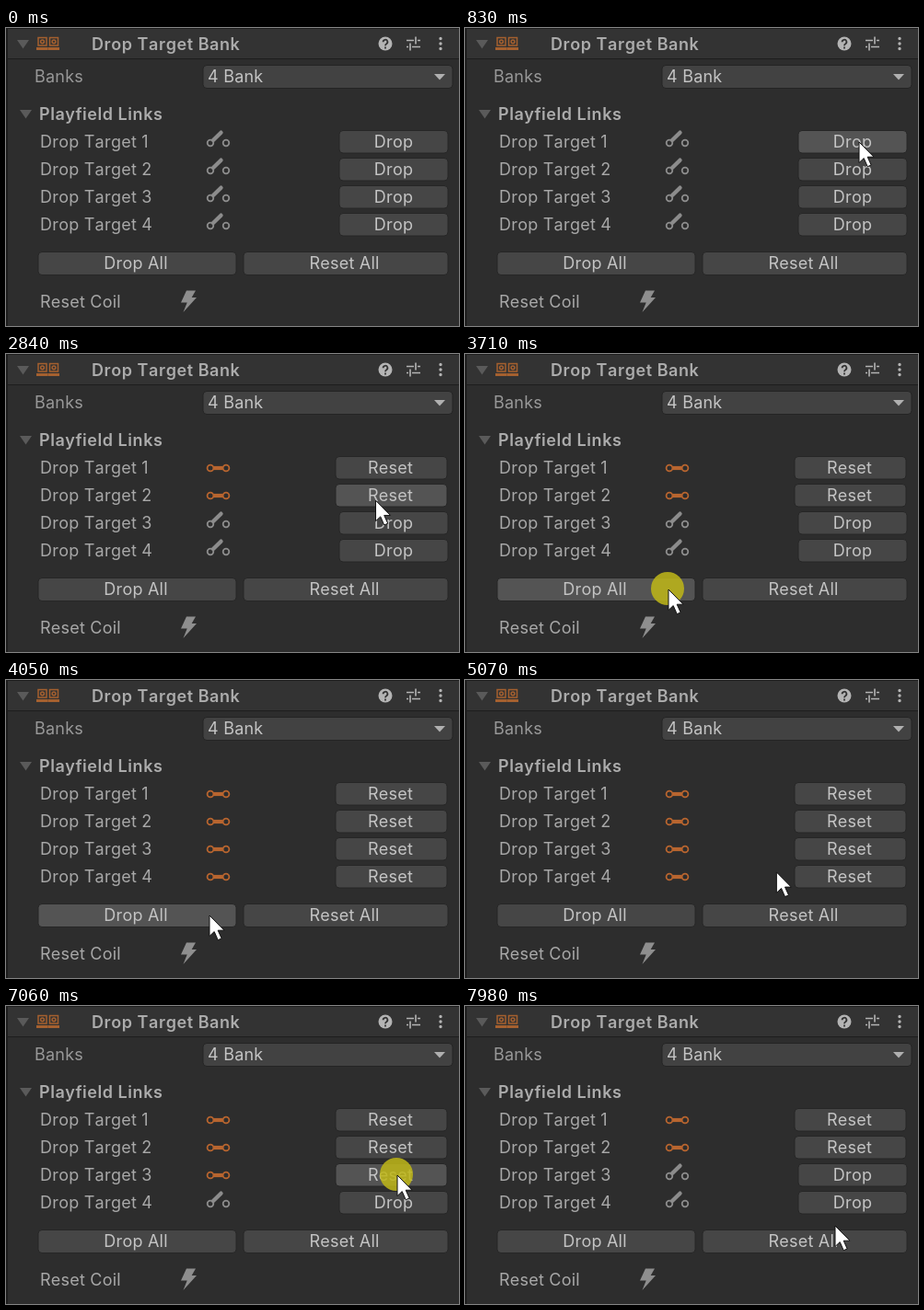
Recreate the animation shown at these times as an HTML page. Size 492x324 px, loop 8000 ms.

```html
<!DOCTYPE html>
<html lang="en">
<head>
<meta charset="utf-8">
<title>Drop Target Bank</title>
<style>
  html, body { margin: 0; width: 100%; height: 100%; overflow: hidden; background: #2d2d2d; }
  svg { display: block; width: 492px; height: 324px; }
  text { font: 18px Inter, sans-serif; font-kerning: none; letter-spacing: .22px; fill: #a8a8a8; }
  .bold { font-weight: 600; letter-spacing: .55px; fill: #acacac; }
  .lit { fill: #c4c4c4; }
  .mid { text-anchor: middle; }
  .dim { fill: #989898; }
  .fold { fill: #5a5a5a; }
  .box { fill: #464646; stroke: #262626; }
  .hover .box { fill: #545454; }
  .press .box { fill: #3d5067; }
  .open { stroke: #8c8c8c; fill: none; }
  .closed { stroke: #b8652f; fill: none; }
</style>
</head>
<body>
<svg viewBox="0 0 492 324">
  <defs>
    <g id="open" class="open" stroke-width="1.8">
      <circle cx="222" cy="125" r="3.3"/>
      <circle cx="239" cy="125" r="3.3"/>
      <path d="M225 122L233.5 113.7" stroke-width="4.4" stroke-linecap="round"/>
    </g>
    <g id="closed" class="closed" stroke-width="1.8">
      <circle cx="222" cy="124" r="3.4"/>
      <circle cx="239" cy="124" r="3.4"/>
      <path d="M225.5 124H235.5" stroke-width="4.2"/>
    </g>
    <g id="target" fill="none" stroke="#a5602f" stroke-width="1.5">
      <rect x="35" y="10.5" width="9" height="8.5"/>
      <circle cx="39.5" cy="14.8" r="1.9"/>
      <path d="M33 22.5H45.5" stroke-width="3"/>
    </g>
  </defs>

  <rect width="492" height="324" fill="#2d2d2d"/>
  <rect width="492" height="33" fill="#333"/>
  <path d="M0 .5H492M0 33.5H492" stroke="#1d1d1d"/>
  <rect width="2" height="324" fill="#1d1d1d"/>

  <path class="fold" d="M12 13H25L18.5 22.5Z"/>
  <use href="#target"/>
  <use href="#target" x="12.5"/>
  <text class="bold" x="93" y="24">Drop Target Bank</text>

  <circle cx="412" cy="17" r="7.5" fill="#b4b4b4"/>
  <path d="M409.6 15.2a2.4 2.4 0 1 1 3.6 2q-1.2.7-1.2 2M412 20.6v1.8" fill="none" stroke="#333" stroke-width="1.8"/>
  <path d="M435 13.5H443M447 13.5H450M435 20.5H437M441 20.5H450M445 9.5V17.5M439 16.5V24.5" stroke="#b4b4b4" stroke-width="1.6"/>
  <path d="M472 11.5h0M472 17h0M472 22.5h0" stroke="#b4b4b4" stroke-width="3.4" stroke-linecap="round"/>

  <text class="dim" x="31" y="59">Banks</text>
  <rect x="214" y="40.5" width="271" height="25" rx="4" fill="#424242" stroke="#242424"/>
  <text class="lit" x="219" y="59">4 Bank</text>
  <path d="M465 50H477L471 56.5Z" fill="#b0b0b0"/>

  <path class="fold" d="M15 89H28L21.5 98.5Z"/>
  <text class="bold" x="36" y="100">Playfield Links</text>
  <g id="rows"></g>
  <text x="37" y="304">Reset Coil</text>
  <path d="M196 285.5H206L201.7 293H207L192.5 309L196.7 298.5H190Z" fill="#8e8e8e"/>

  <g id="pointer">
    <circle id="ring" cx="-1" cy="-1" r="18" fill="#c0b818" fill-opacity=".85"/>
    <path d="M0 0V22.5L5.2 17.6L9.2 26.7L13.2 25L9.2 16.2H16Z" fill="#fff" stroke="#111" stroke-width="1"/>
  </g>
</svg>
<script>
  const LOOP = 8000;
  const $ = id => document.getElementById(id);

  // Pointer tip: time, x, y
  const path = [
    [440, 489, 77], [820, 428, 124], [1300, 428, 124], [1440, 427, 129],
    [1740, 430, 154], [2770, 430, 154], [2840, 402, 159], [3210, 221, 256],
    [4790, 221, 256], [5070, 338, 209], [5350, 411, 207], [5580, 411, 207],
    [5700, 413, 210], [5980, 416, 209], [6180, 416, 209], [6930, 425, 184],
    [7690, 425, 184], [7980, 402, 239], [LOOP, 402, 239]
  ];

  // Ring on, button down, button up, ring off, button index
  const clicks = [
    [870, 910, 960, 1010, 0], [2310, 2350, 2420, 2420, 1], [3710, 3780, 3820, 3850, 4],
    [5610, 5660, 5730, 5770, 3], [7030, 7080, 7150, 7190, 2]
  ];

  // Times at which each row's link and its button label flip
  const flips = [
    { link: [960], label: [1170] },
    { link: [2420], label: [2570] },
    { link: [3820, 7150], label: [4050, 7390] },
    { link: [3820, 5730], label: [4050, 5980] }
  ];

  function add(parent, tag, attrs, content = '') {
    const el = document.createElementNS('http://www.w3.org/2000/svg', tag);
    for (const key in attrs) el.setAttribute(key, attrs[key]);
    el.textContent = content;
    return parent.appendChild(el);
  }

  function addButton(x, y, width, height, label, centre) {
    const group = add($('rows'), 'g', {});
    const box = add(group, 'rect', { class: 'box', x, y, width, height, rx: 4 });
    const text = add(group, 'text', { class: 'lit mid', x: centre, y: y + 18.5 }, label);
    return { group, box, text, x, y, width, height };
  }

  const links = [];
  const buttons = flips.map((_, i) => {
    add($('rows'), 'text', { x: 37, y: 130 + 30 * i }, `Drop Target ${i + 1}`);
    links.push(add($('rows'), 'use', { y: 30 * i }));
    return addButton(362, 111.5 + 30 * i, 118, 24.5, 'Drop', 421);
  });
  buttons.push(addButton(35, 243.5, 215, 25, 'Drop All', 141));
  buttons.push(addButton(258, 243.5, 222, 25, 'Reset All', 367.5));

  function slope(i, axis) {
    const before = path[i - 1], here = path[i], after = path[i + 1];
    if (!before || !after) return 0;
    const still = p => p[1] === here[1] && p[2] === here[2];
    if (still(before) || still(after)) return 0;
    return (after[axis] - before[axis]) / (after[0] - before[0]);
  }

  // Cubic Hermite curve through the points, at rest where the pointer waits
  function tipAt(t) {
    const i = Math.max(0, path.findLastIndex(p => p[0] <= t));
    const a = path[i], b = path[i + 1], span = b[0] - a[0], u = (t - a[0]) / span;
    return [1, 2].map(axis => {
      const ease = u * u * (3 - 2 * u);
      return a[axis] + (b[axis] - a[axis]) * ease
        + span * u * (1 - u) * ((1 - u) * slope(i, axis) - u * slope(i + 1, axis));
    });
  }

  const isOn = (times, t) => times.filter(time => time <= t).length % 2 === 1;

  function draw(t) {
    const shown = t >= path[0][0];
    const [x, y] = shown ? tipAt(t) : [-50, -50];
    $('pointer').setAttribute('transform', `translate(${x} ${y})`);
    $('pointer').style.display = shown ? '' : 'none';
    $('ring').style.display = clicks.some(c => t >= c[0] && t < c[3]) ? '' : 'none';

    flips.forEach(({ link, label }, i) => {
      links[i].setAttribute('href', isOn(link, t) ? '#closed' : '#open');
      const down = isOn(label, t), button = buttons[i];
      button.x = down ? 358 : 362;
      button.width = down ? 121 : 118;
      button.box.setAttribute('x', button.x);
      button.box.setAttribute('width', button.width);
      button.text.setAttribute('x', down ? 417.5 : 421);
      button.text.textContent = down ? 'Reset' : 'Drop';
    });

    buttons.forEach((b, i) => {
      const over = x >= b.x && x <= b.x + b.width && y >= b.y && y <= b.y + b.height;
      const pressed = clicks.some(c => c[4] === i && t >= c[1] && t < c[2]);
      b.group.setAttribute('class', pressed ? 'press' : over ? 'hover' : '');
    });
  }

  function tick() {
    draw(performance.now() % LOOP);
    requestAnimationFrame(tick);
  }
  tick();
</script>
</body>
</html>
```
